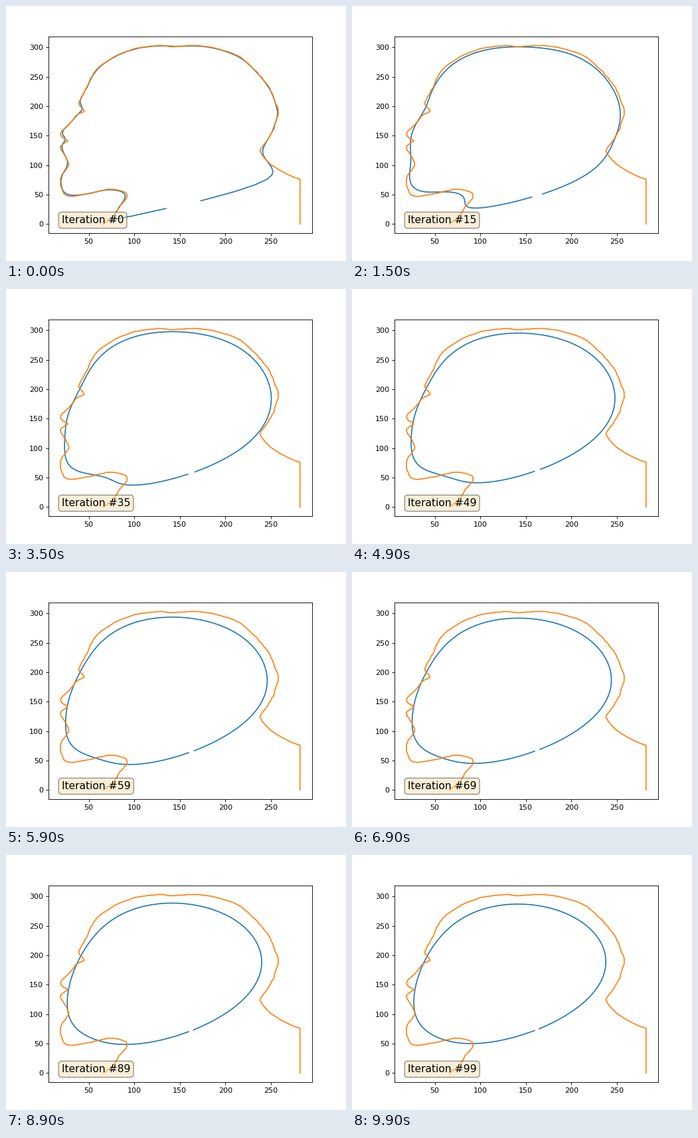
A matplotlib script for the animation above (10000 ms loop, 512x384 px).

```python
import numpy as np
import matplotlib.pyplot as plt
from matplotlib.animation import FuncAnimation

FRAMES = 100
INTERVAL = 100

# Head outline as (vertex spacing, key points), from the nape to the throat.
SECTIONS = [
    (6.8, [(282, 76), (265, 87), (249, 103), (238, 123)]),
    (4.3, [(243, 135), (252, 158), (255, 172), (258, 188)]),
    (5.2, [(256, 202), (249, 229), (239, 250), (224, 274), (212, 287),
           (185, 300), (163, 303), (140, 301)]),
    (4.3, [(130, 303), (105, 299), (92, 293), (78, 284), (61, 266),
           (54, 252), (49, 235)]),
    (3.9, [(42, 215), (39, 204), (45, 191), (38, 186), (28, 169), (20, 156),
           (21, 147), (27, 142), (19, 131), (24, 116), (28, 101), (20, 81),
           (20, 62), (28, 47)]),
    (3.8, [(54, 53), (73, 59), (90, 54), (91, 43), (84, 30), (77, 13),
           (66, 0)]),
]


def spline(keys, fine):
    """Catmull-Rom curve with `fine` samples between neighbouring keys."""
    p = np.vstack([keys[0], keys, keys[-1]])
    t = np.arange(fine)[:, None] / fine
    parts = [b + t / 2 * (c - a + t * (2 * a - 5 * b + 4 * c - d
                                       + t * (3 * (b - c) + d - a)))
             for a, b, c, d in zip(p, p[1:], p[2:], p[3:])]
    return np.vstack(parts + [keys[-1]])


def build_outline(fine=40):
    """Sample the spline at the wanted spacing, snapped to whole units."""
    keys = np.array([key for _, part in SECTIONS for key in part], float)
    steps = [step for step, part in SECTIONS for _ in part][1:]
    path = spline(keys, fine)
    lengths = np.hypot(*np.diff(path, axis=0).T)
    index = np.concatenate([[0], np.cumsum(lengths / np.repeat(steps, fine))])
    at = np.linspace(0, index[-1], round(index[-1]) + 1)
    points = np.column_stack([np.interp(at, index, c) for c in path.T])
    return np.vstack([(282, 0), np.round(points)])


def smooth(curve):
    """Move every point, in place, halfway between its two neighbours."""
    n = len(curve)
    for i in range(n):
        curve[i] = (curve[i - 1] + curve[(i + 1) % n]) / 2


def evolve(outline):
    curve = outline.copy()
    smooth(curve)
    states = []
    for _ in range(FRAMES):
        smooth(curve)
        states.append(curve.copy())
    return states


outline = build_outline()
states = evolve(outline)

plt.rcParams["text.kerning_factor"] = 6
fig, ax = plt.subplots(figsize=(6.4, 4.8), dpi=80)
line, = ax.plot(*states[0].T)
ax.plot(*outline.T)
ax.set_xlim(5.85, 295.15)
ax.set_ylim(-15.15, 318.15)
label = ax.text(0.05, 0.05, "", transform=ax.transAxes, fontsize=14,
                bbox=dict(boxstyle="round", facecolor="wheat", alpha=0.5))


def update(frame):
    line.set_data(*states[frame].T)
    label.set_text(f"Iteration #{frame}")
    return line, label


anim = FuncAnimation(fig, update, frames=FRAMES, interval=INTERVAL,
                     repeat=True, repeat_delay=0)
plt.show()
```
